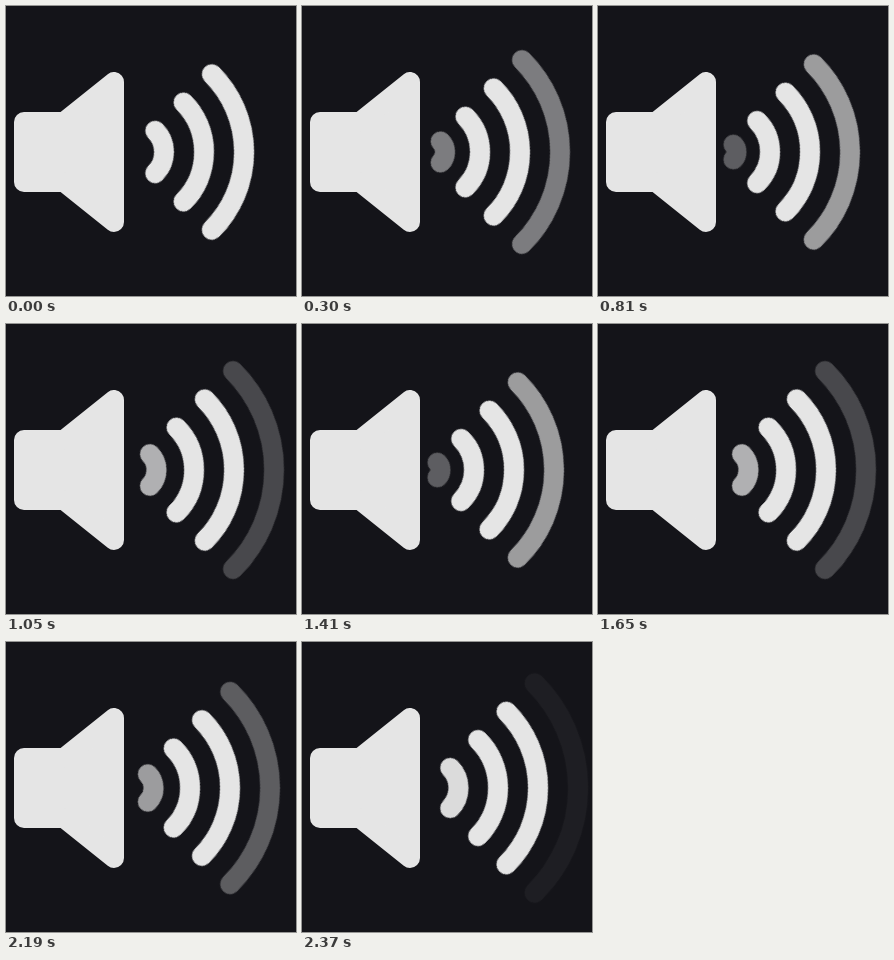
Recreate the animation shown at these times as an HTML page. Size 290 px wide and 290 px high, loop 2400 ms.

```html
<!DOCTYPE html>
<html lang="en">
<head>
<meta charset="utf-8">
<title>Speaker</title>
<style>
  html, body {
    margin: 0;
    width: 100%;
    height: 100%;
    overflow: hidden;
    background: #141419;
  }
  svg {
    display: block;
    width: 290px;
    height: 290px;
    stroke: #e5e5e5;
    stroke-width: 20;
    stroke-linecap: round;
    stroke-linejoin: round;
  }
  .speaker { fill: #e5e5e5; }
  /* Each wave is a quarter circle that grows into the next one's place */
  .wave {
    fill: none;
    stroke-dasharray: 1 9;
    animation: grow .6s linear infinite;
  }
  .w1 { --from: 0px; --to: 30px; animation-name: grow, appear; }
  .w2 { --from: 30px; --to: 70px; }
  .w3 { --from: 70px; --to: 110px; }
  .w4 { --from: 110px; --to: 150px; animation-name: grow, vanish; }
  @keyframes grow {
    from { r: var(--from); }
    to { r: var(--to); }
  }
  @keyframes appear {
    from { opacity: 0; }
    to { opacity: 1; }
  }
  @keyframes vanish {
    from { opacity: 1; }
    to { opacity: 0; }
  }
</style>
</head>
<body>
<svg viewBox="0 0 290 290">
  <g transform="translate(128 146) rotate(-45)">
    <circle class="wave w1" r="30" pathLength="4"/>
    <circle class="wave w2" r="30" pathLength="4"/>
    <circle class="wave w3" r="70" pathLength="4"/>
    <circle class="wave w4" r="110" pathLength="4"/>
  </g>
  <path class="speaker" d="M18 116H58L108 76V216L58 176H18Z"/>
</svg>
</body>
</html>
```
